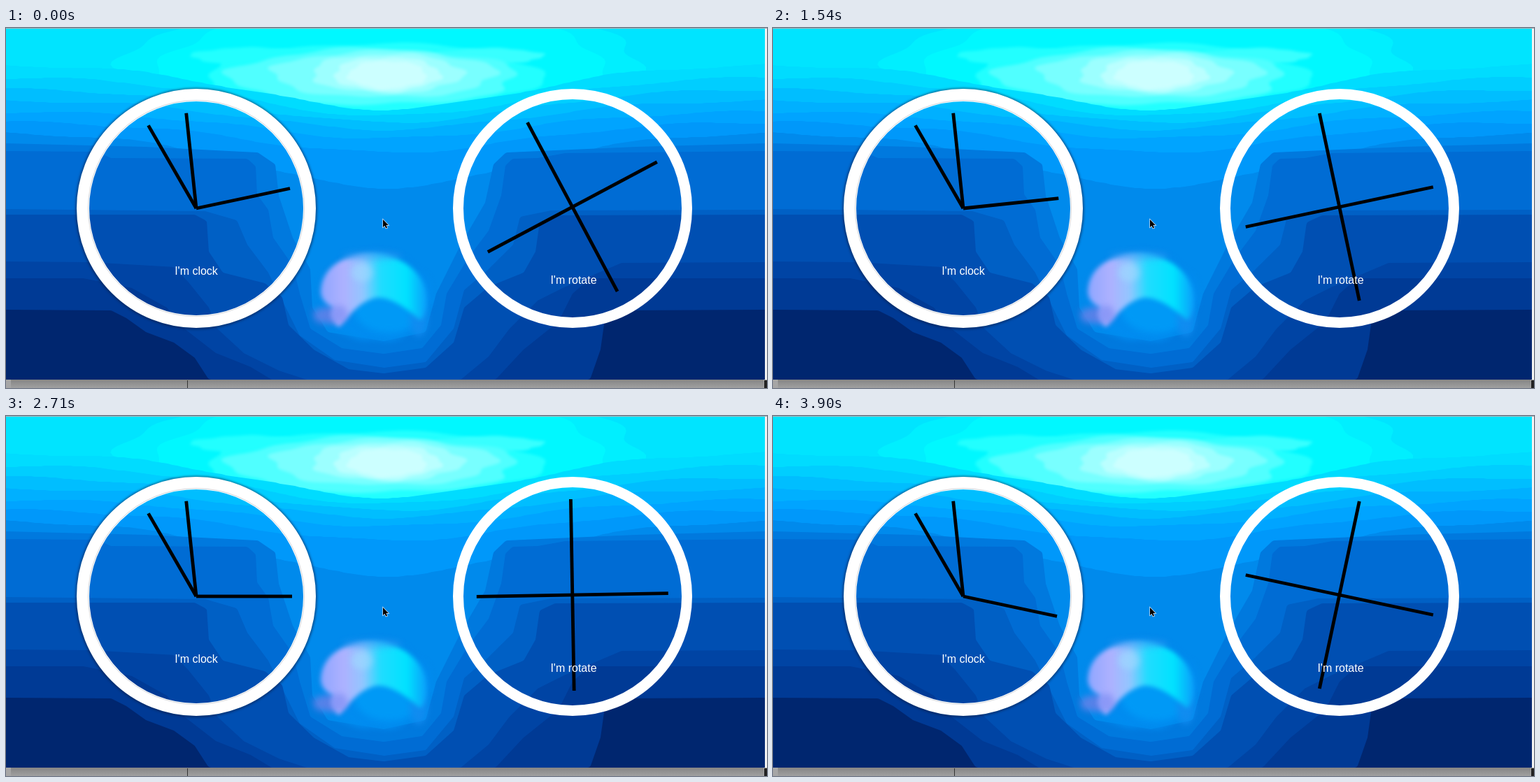
Recreate the animation shown at these times as an HTML page with a canvas. Size 1088 by 515 pixels, loop 4 s.

```html
<!DOCTYPE html>
<html lang="en">
<head>
<meta charset="utf-8">
<title>Clock and rotate</title>
<style>
html, body { margin: 0; width: 100%; height: 100%; overflow: hidden; background: #fff; }
canvas { display: block; }
</style>
</head>
<body>
<canvas id="stage" width="1088" height="515"></canvas>
<script>
const W = 1088, H = 515, SEA_W = 1085, SEA_H = 503;
const LOOP = 4000;
const STEPS = [0, 150, 320, 490, 660, 800, 950, 1100, 1240, 1390, 1530, 1680, 1830, 1980,
  2120, 2270, 2420, 2570, 2720, 2860, 3010, 3160, 3310, 3460, 3610, 3760, 3900];
const ctx = document.getElementById('stage').getContext('2d');
const rad = deg => deg * Math.PI / 180;

// Fills everything below a contour with slightly rounded corners.
function below(c, color, pts) {
  c.fillStyle = color;
  c.beginPath();
  c.moveTo(0, SEA_H);
  c.lineTo(pts[0], pts[1]);
  for (let i = 2; i < pts.length - 2; i += 2) {
    c.arcTo(pts[i], pts[i + 1], pts[i + 2], pts[i + 3], 6);
  }
  c.lineTo(SEA_W, pts[pts.length - 1]);
  c.lineTo(SEA_W, SEA_H);
  c.fill();
}

// Ellipse with an uneven rim.
function blob(c, color, x, y, rx, ry, rough = 0) {
  c.fillStyle = color;
  c.beginPath();
  for (let a = 0; a < 360; a += 3) {
    const t = rad(a);
    const r = 1 + rough * (Math.sin(5 * t + rx) + 0.6 * Math.sin(11 * t + ry));
    c.lineTo(x + rx * r * Math.cos(t), y + ry * r * Math.sin(t));
  }
  c.fill();
}

function drawGlow(c) {
  c.fillStyle = '#00e4ff';
  c.fillRect(0, 0, SEA_W, SEA_H);
  blob(c, '#00efff', 540, 44, 370, 75, 0.04);
  blob(c, '#00f8ff', 540, 52, 320, 72, 0.04);
  c.filter = 'blur(2px)';
  blob(c, '#22ffff', 525, 70, 240, 48, 0.04);
  blob(c, '#22ffff', 350, 40, 85, 12, 0.05);
  blob(c, '#38ffff', 690, 40, 78, 11, 0.05);
  blob(c, '#50ffff', 525, 70, 205, 40, 0.05);
  blob(c, '#78ffff', 540, 66, 160, 33, 0.05);
  blob(c, '#9cffff', 545, 65, 108, 28, 0.05);
  blob(c, '#baffff', 545, 66, 76, 24, 0.05);
  blob(c, '#ccffff', 545, 67, 56, 20, 0.05);
  c.filter = 'none';
}

function drawBands(c) {
  // [edge height, middle height, green, blue]
  const bands = [[52, 116, 220, 255], [70, 126, 206, 255], [87, 135, 190, 255],
    [103, 145, 176, 255], [119, 158, 164, 255], [134, 178, 152, 250], [149, 228, 138, 236]];
  bands.forEach(([edge, mid, g, b], i) => {
    c.fillStyle = `rgb(0 ${g} ${b})`;
    c.beginPath();
    c.moveTo(0, SEA_H);
    for (let x = 0; x <= SEA_W; x += 7) {
      const bell = Math.exp(-(((x - 545) / 270) ** 2));
      const wave = 2 * Math.sin(x / 37 + i * 2);
      c.lineTo(x, Math.round(edge + (mid - edge) * bell + wave));
    }
    c.lineTo(SEA_W, SEA_H);
    c.fill();
  });
}

function drawDepths(c) {
  below(c, '#0079de', [0, 165, 200, 170, 360, 178, 385, 195, 390, 240, 410, 300, 435, 345,
    438, 400, 460, 435, 540, 448, 600, 435, 615, 380, 650, 310, 685, 250, 697, 195,
    715, 178, 900, 170, 1085, 165]);
  below(c, '#006cd4', [0, 176, 130, 177, 150, 186, 345, 187, 357, 198, 359, 238, 375, 260,
    382, 300, 410, 340, 420, 380, 435, 430, 480, 458, 540, 466, 595, 458, 622, 425,
    630, 380, 660, 330, 690, 290, 708, 240, 714, 197, 724, 187, 760, 186, 800, 179, 1085, 176]);
  below(c, '#0060c5', [0, 259, 100, 260, 285, 262, 330, 275, 345, 310, 375, 350, 400, 400,
    420, 440, 470, 475, 540, 486, 600, 478, 640, 430, 655, 375, 690, 345, 725, 310,
    735, 270, 780, 261, 1085, 260]);
  below(c, '#004fb2', [0, 267, 270, 267, 287, 276, 290, 320, 310, 350, 370, 365, 395, 385,
    404, 425, 440, 460, 490, 488, 540, 494, 600, 486, 640, 450, 655, 400, 690, 370,
    740, 350, 757, 320, 763, 278, 785, 268, 1085, 267]);
  below(c, '#0044a4', [0, 334, 120, 335, 240, 342, 262, 365, 290, 400, 302, 430, 340, 465,
    390, 490, 430, 503, 650, 503, 690, 470, 720, 430, 760, 390, 800, 370, 880, 336, 1085, 335]);
  below(c, '#003a95', [0, 358, 110, 358, 180, 372, 230, 400, 255, 430, 300, 465, 350, 485,
    380, 503, 700, 503, 740, 460, 790, 420, 810, 380, 835, 358, 1085, 358]);
  below(c, '#00266f', [0, 403, 150, 404, 172, 415, 200, 435, 240, 450, 270, 472, 290, 503,
    835, 503, 850, 460, 857, 410, 875, 404, 1085, 403]);
}

function drawCreature(c) {
  const tint = c.createLinearGradient(448, 0, 604, 0);
  tint.addColorStop(0, '#8ba5ff');
  tint.addColorStop(0.22, '#aeb1ff');
  tint.addColorStop(0.4, '#92c6ff');
  tint.addColorStop(0.56, '#20dcff');
  tint.addColorStop(0.8, '#00e2ff');
  tint.addColorStop(1, '#0c98fa');
  c.filter = 'blur(5px)';
  blob(c, '#008cf0', 528, 385, 78, 63, 0.03);
  blob(c, '#0099f6', 548, 402, 50, 34);
  blob(c, '#5582e8', 460, 411, 21, 12, 0.05);
  blob(c, '#108cf0', 590, 416, 12, 25);
  c.filter = 'blur(3px)';
  c.fillStyle = tint;
  c.beginPath();
  c.moveTo(450, 378);
  c.bezierCurveTo(451, 338, 490, 322, 525, 323);
  c.bezierCurveTo(570, 324, 603, 356, 602, 390);
  c.quadraticCurveTo(601, 410, 592, 418);
  c.bezierCurveTo(576, 404, 552, 384, 528, 386);
  c.bezierCurveTo(506, 392, 496, 405, 476, 428);
  c.quadraticCurveTo(460, 412, 468, 400);
  c.quadraticCurveTo(451, 392, 450, 378);
  c.fill();
  c.filter = 'blur(4px)';
  c.globalAlpha = 0.55;
  blob(c, '#3a9cf6', 523, 326, 42, 6);
  blob(c, '#a0dcff', 509, 350, 15, 13);
  blob(c, '#7486f0', 476, 410, 13, 13);
  c.globalAlpha = 1;
  c.filter = 'none';
}

function drawFrame(c) {
  c.fillStyle = '#a9b4b8';
  c.fillRect(0, 0, W, 1);
  c.fillStyle = '#f2f2f2';
  c.fillRect(SEA_W, 1, W - SEA_W, SEA_H);
  const bar = c.createLinearGradient(0, SEA_H, 0, H);
  bar.addColorStop(0, '#858585');
  bar.addColorStop(1, '#a0a0a0');
  c.fillStyle = '#a6a6a6';
  c.fillRect(0, SEA_H, W, H - SEA_H);
  c.fillStyle = bar;
  c.beginPath();
  c.roundRect(7, SEA_H, 1076, 20, [0, 0, 10, 10]);
  c.fill();
  c.fillStyle = '#333';
  c.fillRect(259, SEA_H + 1, 1, H);
  c.fillStyle = '#222';
  c.fillRect(1084, SEA_H + 1, 4, H);
}

function ring(c, x, y, r, width, color) {
  c.strokeStyle = color;
  c.lineWidth = width;
  c.beginPath();
  c.arc(x, y, r, 0, 2 * Math.PI);
  c.stroke();
}

function makeScene() {
  const layer = document.createElement('canvas');
  layer.width = W;
  layer.height = H;
  const c = layer.getContext('2d');
  drawGlow(c);
  drawBands(c);
  drawDepths(c);
  drawCreature(c);
  drawFrame(c);
  c.filter = 'blur(1.5px)';
  ring(c, 272, 258.5, 170.5, 5, 'rgb(0 30 70 / .5)');
  c.filter = 'none';
  ring(c, 272, 258, 162, 18, '#fff');
  ring(c, 272, 258, 154.5, 1, '#d2d5da');
  ring(c, 810, 258, 163.5, 15, '#fff');
  return layer;
}

function hand(x, y, deg, from, to) {
  ctx.save();
  ctx.translate(x, y);
  ctx.rotate(rad(deg));
  ctx.fillStyle = '#000';
  ctx.fillRect(-2.4, -to, 4.8, to - from);
  ctx.restore();
}

function label(text, x, y) {
  ctx.font = '16px "Liberation Sans", Arial, sans-serif';
  ctx.textAlign = 'center';
  ctx.fillStyle = '#fff';
  ctx.fillText(text, x, y);
}

function pointer(x, y) {
  ctx.save();
  ctx.translate(x, y);
  ctx.beginPath();
  [[0, 0], [0, 11], [2.5, 8.7], [4.2, 12.6], [6, 11.8], [4.4, 8], [7.8, 8]]
    .forEach(p => ctx.lineTo(...p));
  ctx.closePath();
  ctx.lineWidth = 1.4;
  ctx.strokeStyle = '#dce8f4';
  ctx.stroke();
  ctx.fillStyle = '#000';
  ctx.fill();
  ctx.restore();
}

const scene = makeScene();

function render(now) {
  const time = now % LOOP;
  const t = STEPS.findLast(s => s <= time) ?? 0;
  const second = 78 + 6 * Math.floor((t + 240) / 1000);
  const turn = -28 + (t ? Math.floor((t + 135) / 100) : 0);

  ctx.drawImage(scene, 0, 0);
  hand(272, 258, -30, 0, 137);
  hand(272, 258, -6, 0, 137);
  hand(272, 258, second, 0, 137);
  hand(809.8, 256, turn, -137, 137);
  hand(809.8, 256, turn + 90, -137, 137);
  label("I'm clock", 272, 353);
  label("I'm rotate", 811.5, 366);
  pointer(539, 274);
}

const start = performance.now();
function tick() {
  render(performance.now() - start);
  requestAnimationFrame(tick);
}
tick();
</script>
</body>
</html>
```
